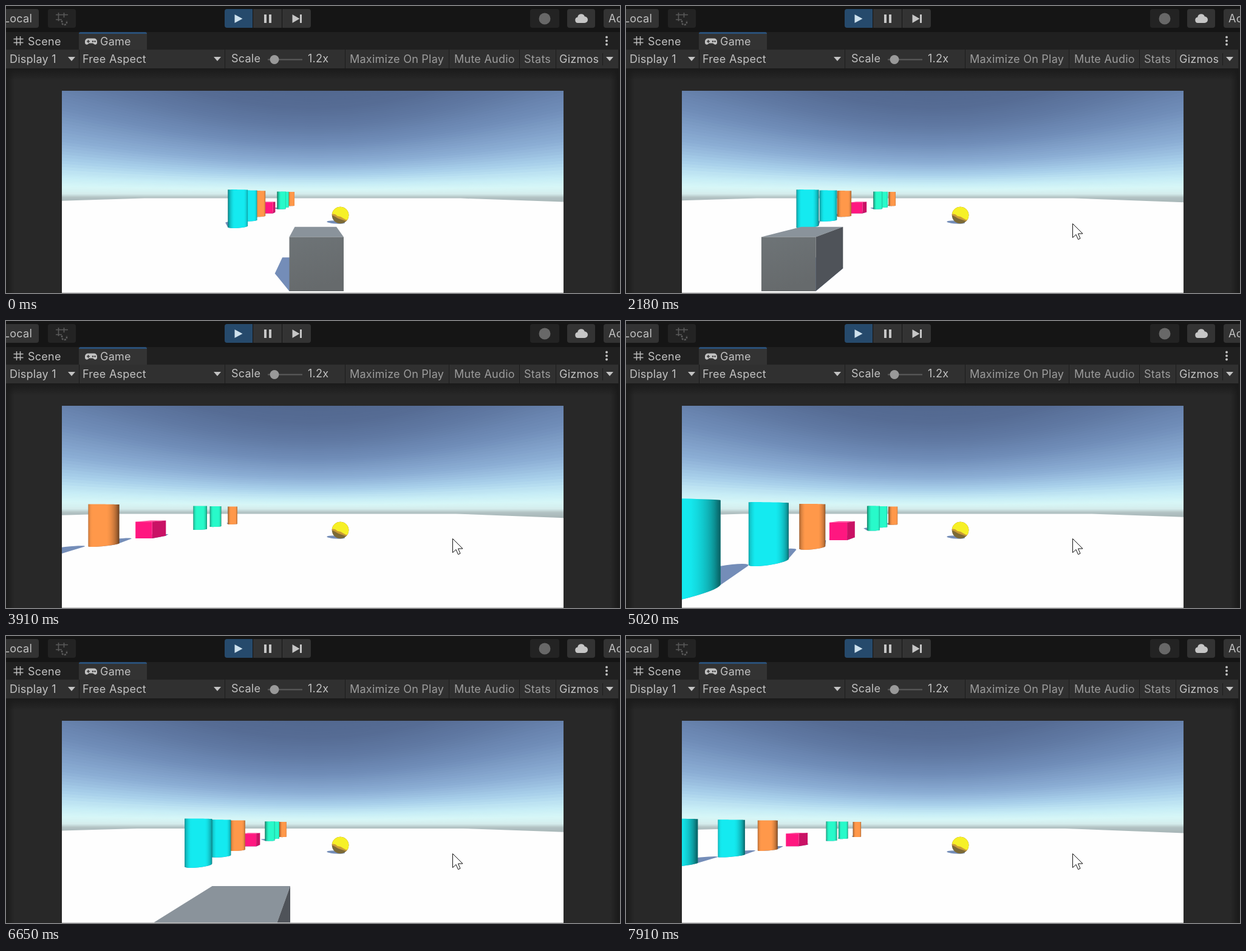
Recreate the animation shown at these times as an HTML page. Size 1011 px wide and 474 px high, loop 8000 ms.

```html
<!DOCTYPE html>
<html lang="en">
<head>
<meta charset="utf-8">
<title>Rolling ball</title>
<style>
html, body { margin: 0; width: 100%; height: 100%; overflow: hidden; background: #282828; }
svg { display: block; }
text { font: 18px Inter, "Open Sans", sans-serif; letter-spacing: .25px; fill: #c2c2c2; }
.dim { fill: #9c9c9c; }
</style>
</head>
<body>
<svg id="stage" width="1011" height="474" viewBox="0 0 1011 474">
  <defs>
    <clipPath id="view"><rect x="92" y="140" width="826" height="334"/></clipPath>
    <clipPath id="ballClip"><circle cx="550.5" cy="345.5" r="13.8"/></clipPath>
    <linearGradient id="topShade" x2="0" y2="1">
      <stop stop-color="#1a1a1a"/><stop offset="1" stop-color="#1a1a1a" stop-opacity="0"/>
    </linearGradient>
    <linearGradient id="leftShade">
      <stop stop-color="#1a1a1a"/><stop offset="1" stop-color="#1a1a1a" stop-opacity="0"/>
    </linearGradient>
    <linearGradient id="grayFront" x2=".3" y2="1">
      <stop stop-color="#6e7477"/><stop offset="1" stop-color="#666a6c"/>
    </linearGradient>
  </defs>

  <rect width="1011" height="474" fill="#282828"/>
  <rect y="103" width="1011" height="20" fill="url(#topShade)"/>
  <rect y="103" width="14" height="371" fill="url(#leftShade)"/>
  <rect x="-1009" y="103" width="14" height="371" fill="url(#leftShade)" transform="scale(-1 1)"/>
  <rect x="1008.500" y="72" width="3" height="402" fill="#1c1c1c"/>

  <!-- main toolbar -->
  <rect width="1011" height="43" fill="#151515"/>
  <g fill="#333">
    <rect x="-10" y="5" width="64" height="31" rx="4"/>
    <rect x="924" y="5" width="46" height="31" rx="4"/>
    <rect x="984" y="5" width="40" height="31" rx="4"/>
    <rect x="407" y="5" width="47" height="31"/>
    <path d="M455 5h43a4 4 0 0 1 4 4v23a4 4 0 0 1-4 4h-43z"/>
  </g>
  <g fill="#232323">
    <rect x="69" y="5" width="46" height="31" rx="4"/>
    <rect x="863" y="5" width="48" height="31" rx="4"/>
  </g>
  <path d="M406 5h-42a4 4 0 0 0-4 4v23a4 4 0 0 0 4 4h42z" fill="#264a6c"/>
  <path d="M376.500 14l13 7-13 7z" fill="#cfe2ee"/>
  <path d="M425 14h4v14h-4zM433 14h4v14h-4zM471.500 14l12 7-12 7zM484 14h3v14h-3z" fill="#c6c6c6"/>
  <path d="M86.500 11v14M95.500 11v8M82 14.500h20M82 22.500h10" stroke="#5a5a5a" stroke-width="1.600" fill="none"/>
  <path d="M92 24v3a4 4 0 0 0 8 0v-3" stroke="#5a5a5a" stroke-width="2.500" stroke-dasharray="3 1.500" fill="none"/>
  <circle cx="887" cy="21" r="9.500" fill="#686868"/>
  <path d="M941.500 28a4.800 4.800 0 0 1-.3-9.500 6 6 0 0 1 11.600-1.200 5.300 5.300 0 0 1-.3 10.700z" fill="#c6c6c6"/>
  <text x="43" y="27" text-anchor="end">Local</text>
  <text x="992" y="27">Account</text>

  <!-- tabs -->
  <rect y="43" width="1011" height="29" fill="#202020"/>
  <path d="M120 72V46a3 3 0 0 1 3-3h106a3 3 0 0 1 3 3v26z" fill="#333"/>
  <path d="M120 46a3 3 0 0 1 3-3h106a3 3 0 0 1 3 3z" fill="#2a5078"/>
  <path d="M17.500 50v15M23.500 50v15M12.500 54.500h16M12.500 60.500h16" stroke="#bbb" stroke-width="1.500"/>
  <path d="M135 53.500h10a5 5 0 0 1 5 5v2.500a3 3 0 0 1-5 2l-2-1.500h-6l-2 1.500a3 3 0 0 1-5-2v-2.500a5 5 0 0 1 5-5z" fill="#c2c2c2"/>
  <path d="M133 58.500h5M135.500 56v5" stroke="#333" stroke-width="1.500"/>
  <circle cx="143" cy="58.500" r="1.300" fill="#333"/><circle cx="146.500" cy="58.500" r="1.300" fill="#333"/>
  <text x="36" y="65">Scene</text>
  <text x="155" y="65">Game</text>
  <g fill="#c2c2c2"><circle cx="989" cy="51.500" r="1.900"/><circle cx="989" cy="57.500" r="1.900"/><circle cx="989" cy="63.500" r="1.900"/></g>

  <!-- view options -->
  <rect y="72" width="1008" height="31" fill="#303030"/>
  <path d="M120.500 72v31M360.500 72v31M558.500 72v31M729.500 72v31M845.500 72v31M905.500 72v31M982.500 78v20" stroke="#1d1d1d"/>
  <path d="M102 84h12l-6 7zM342 84h12l-6 7zM988 84h12l-6 7z" fill="#c2c2c2"/>
  <path d="M431 88.500h57" stroke="#5c5c5c" stroke-width="2"/>
  <circle cx="442" cy="88.500" r="7.500" fill="#999"/>
  <text x="6" y="94">Display 1</text>
  <text x="126" y="94">Free Aspect</text>
  <text x="371" y="93">Scale</text>
  <text x="497" y="93">1.2x</text>
  <text x="566" y="94" class="dim">Maximize On Play</text>
  <text x="738" y="94" class="dim">Mute Audio</text>
  <text x="853" y="94" class="dim">Stats</text>
  <text x="911" y="94">Gizmos</text>

  <!-- game view -->
  <g clip-path="url(#view)">
    <g id="sky"></g>
    <path id="floor" fill="#fefefe"/>
    <g id="shadows" fill="#748db8"></g>
    <g clip-path="url(#ballClip)">
      <rect x="536" y="331" width="30" height="30" fill="#7c6a37"/>
      <path d="M536 345l6 3 5 3 6 2 6 2 7 2V330h-30z" fill="#c99a35"/>
      <path d="M536 343l6 1 4 3 5 1 5 3 4 2 6 1V330h-30z" fill="#f6f026"/>
    </g>
    <g id="solids"></g>
    <rect x="92" y="473" width="826" height="1" fill="#c4c4c4"/>
  </g>
  <path id="cursor" d="M.5 .5v23l5.500-5 3.500 8 3.500-1.500-3.500-8h7.500z" fill="#fff" stroke="#111"/>
</svg>
<script>
const LOOP = 8000, FOCAL = 294.4, CX = 505, HORIZON = 309.3, EYE = 1.807, NEAR = .2;
const SUN = { x: -.42, z: .727, angle: Math.PI / 6 };
const $ = id => document.getElementById(id);

function add(parent, tag, attrs = {}) {
  const el = document.createElementNS("http://www.w3.org/2000/svg", tag);
  for (const k in attrs) el.setAttribute(k, attrs[k]);
  return parent.appendChild(el);
}

const lerp = (a, b, u) => a + (b - a) * u;

// Value list at time t from rows of [time, ...values]
function sample(rows, t) {
  let i = 1;
  while (i < rows.length - 1 && rows[i][0] < t) i++;
  const a = rows[i - 1], b = rows[i];
  const u = Math.min(1, Math.max(0, (t - a[0]) / (b[0] - a[0])));
  return a.slice(1).map((v, k) => lerp(v, b[k + 1], u));
}

const project = ([x, y, z]) => [CX + x * FOCAL / z, HORIZON + (EYE - y) * FOCAL / z];

// Cut a 3D polygon at the near plane and return its path on screen
function outline(points) {
  const kept = [];
  points.forEach((p, i) => {
    const q = points[(i + 1) % points.length];
    if (p[2] >= NEAR) kept.push(p);
    if ((p[2] < NEAR) !== (q[2] < NEAR)) {
      const u = (NEAR - p[2]) / (q[2] - p[2]);
      kept.push(p.map((v, k) => lerp(v, q[k], u)));
    }
  });
  return toPath(kept.map(project));
}

const toPath = pts => pts.length
  ? "M" + pts.map(p => p[0].toFixed(1) + " " + p[1].toFixed(1)).join("L") + "Z" : "";

function buildSky() {
  const stops = [
    [-20, 82, 104, 143], [140, 82, 104, 143], [170, 86, 108, 148], [200, 96, 121, 163],
    [230, 112, 141, 184], [260, 139, 173, 212], [280, 168, 207, 234],
    [295, 199, 237, 246], [304, 215, 247, 247], [311, 212, 236, 236], [317, 178, 194, 195], [330, 160, 174, 176]
  ];
  const color = y => `rgb(${sample(stops, y).map(Math.round)})`;
  const sky = $("sky");
  add(sky, "rect", { x: 92, y: 140, width: 826, height: 334, fill: color(326) });
  for (let y = 326; y > 138; y -= y > 290 ? 1.5 : 3) {
    const pts = [[918, 130], [92, 130]];
    for (let x = 92; x <= 918; x += 59) {
      const bend = y < HORIZON ? Math.hypot(1, (x - CX) / FOCAL) : 1;
      pts.push([x, HORIZON - (HORIZON - y) * bend]);
    }
    add(sky, "path", { d: toPath(pts), fill: color(y) });
  }
}

// Ground shadow of an upright cylinder
function capsule(x, z, r, height) {
  const start = Math.atan2(SUN.z, SUN.x) - Math.PI / 2, pts = [];
  for (let i = 0; i <= 24; i++) {
    const far = i <= 12, a = start + Math.PI * (far ? i : i - 1) / 12;
    const h = far ? height : 0;
    pts.push([x + h * SUN.x + r * Math.cos(a), 0, z + h * SUN.z + r * Math.sin(a)]);
  }
  return outline(pts);
}

function makeCylinder(dx, dz, rgb, id) {
  const STEPS = 20, R = .5;
  const shadow = add($("shadows"), "path");
  const grad = add(document.querySelector("defs"), "linearGradient", { id, gradientUnits: "userSpaceOnUse" });
  const stops = Array.from({ length: STEPS + 1 }, () => add(grad, "stop"));
  const body = add($("solids"), "path", { fill: `url(#${id})` });
  return (ox, oz) => {
    const x = ox + dx, z = oz + dz;
    const facing = Math.atan2(-x, z), span = Math.acos(R / Math.hypot(x, z));
    const top = [], bottom = [], light = [];
    for (let i = 0; i <= STEPS; i++) {
      const a = facing + span * (2 * i / STEPS - 1);
      const px = x + R * Math.sin(a), pz = z - R * Math.cos(a);
      top.push(project([px, 2, pz]));
      bottom.unshift(project([px, 0, pz]));
      light.push(Math.min(1, .45 + .64 * Math.max(0, Math.cos(a - SUN.angle))));
    }
    const left = top[0][0], right = top[STEPS][0];
    grad.setAttribute("x1", left);
    grad.setAttribute("x2", right);
    stops.forEach((s, i) => {
      s.setAttribute("offset", (top[i][0] - left) / (right - left));
      s.setAttribute("stop-color", `rgb(${rgb.map(c => Math.round(c * light[i]))})`);
    });
    body.setAttribute("d", toPath(top.concat(bottom)));
    shadow.setAttribute("d", capsule(x, z, R, 2));
  };
}

function makeCube(dx, dz, front, side, lid) {
  const shadow = add($("shadows"), "path");
  const [topFace, sideFace, frontFace] = [lid, side, front].map(fill => add($("solids"), "path", { fill }));
  return (ox, oz) => {
    const x = ox + dx, z = oz + dz;
    const l = x - .5, r = x + .5, n = z - .5, f = z + .5;
    const cast = (px, pz) => [px + SUN.x, 0, pz + SUN.z];
    const s = r < 0 ? r : l;
    const showSide = r < 0 || l > 0;
    topFace.setAttribute("d", outline([[l, 1, n], [r, 1, n], [r, 1, f], [l, 1, f]]));
    sideFace.setAttribute("d", showSide ? outline([[s, 0, n], [s, 1, n], [s, 1, f], [s, 0, f]]) : "");
    frontFace.setAttribute("d", outline([[l, 0, n], [r, 0, n], [r, 1, n], [l, 1, n]]));
    shadow.setAttribute("d", outline([[l, 0, n], [r, 0, n], [r, 0, f], cast(r, f), cast(l, f), cast(l, n)]));
  };
}

function ballShadow() {
  const a0 = Math.atan2(SUN.z, SUN.x), pts = [];
  for (let i = 0; i < 24; i++) {
    const u = .653 * Math.cos(i * Math.PI / 12), v = .5 * Math.sin(i * Math.PI / 12);
    pts.push([1.65 + SUN.x / 2 + u * Math.cos(a0) - v * Math.sin(a0), 0,
      10.8 + SUN.z / 2 + u * Math.sin(a0) + v * Math.cos(a0)]);
  }
  add($("shadows"), "path", { d: outline(pts) });
}

const CYAN = [20, 234, 240], MINT = [40, 250, 202], ORANGE = [255, 152, 74];

buildSky();
ballShadow();
// Offsets from the nearest cyan cylinder, far to near
const solids = [
  makeCylinder(.97, 16.05, ORANGE, "c1"),
  makeCylinder(.52, 13.3, MINT, "c2"),
  makeCylinder(.5, 10.9, MINT, "c3"),
  makeCube(.05, 6.75, "#ff1780", "#c91265", "#ff3d92"),
  makeCylinder(-.15, 4.4, ORANGE, "c4"),
  makeCylinder(-.13, 2.2, CYAN, "c5"),
  makeCylinder(.04, 0, CYAN, "c6"),
  makeCube(4.17, -5.93, "url(#grayFront)", "#4f5359", "#8a939b")
];

// Position of the nearest cyan cylinder seen from the camera: time, x, z
const route = [
  [0, -4.1, 9.72], [1640, -4.1, 9.72], [2850, -10.15, 9.72], [4030, -10.15, 3.87],
  [4060, -10.15, 3.87], [5245, -4.28, 3.85], [5690, -4.28, 3.72], [6470, -4.28, 7.72],
  [6520, -4.28, 7.72], [7910, -11.07, 7.75]
];

const pointer = [
  [500, 823, 406], [560, 744, 362], [700, 735, 355], [770, 724, 346],
  [840, 717, 342], [900, 721, 346], [970, 729, 353], [1040, 735, 359]
];

// The camera advances in steps of about 69 ms and rests between the two drives
function snap(t) {
  if (t < 1700) return 0;
  const [base, slack] = t < 5690 ? [1700, 6] : [5690, 18];
  const at = base + Math.floor((t - base + slack) / 69.2) * 69.2;
  return t < 5690 ? Math.min(at, 5298) : at;
}

function render(t) {
  const [x, z] = sample(route, snap(t));
  const l = x - 56, r = x + 57, far = z + 54.3;
  $("floor").setAttribute("d", outline([[l, 0, .5], [r, 0, .5], [r, 0, far], [l, 0, far]]));
  solids.forEach(draw => draw(x, z));

  const spot = pointer.filter(p => p[0] <= t).pop();
  $("cursor").setAttribute("visibility", spot ? "visible" : "hidden");
  if (spot) $("cursor").setAttribute("transform", `translate(${spot[1]} ${spot[2]})`);
}

const begin = performance.now();
function tick(now) {
  render(Math.max(0, now - begin) % LOOP);
  requestAnimationFrame(tick);
}
render(0);
requestAnimationFrame(tick);
</script>
</body>
</html>
```
